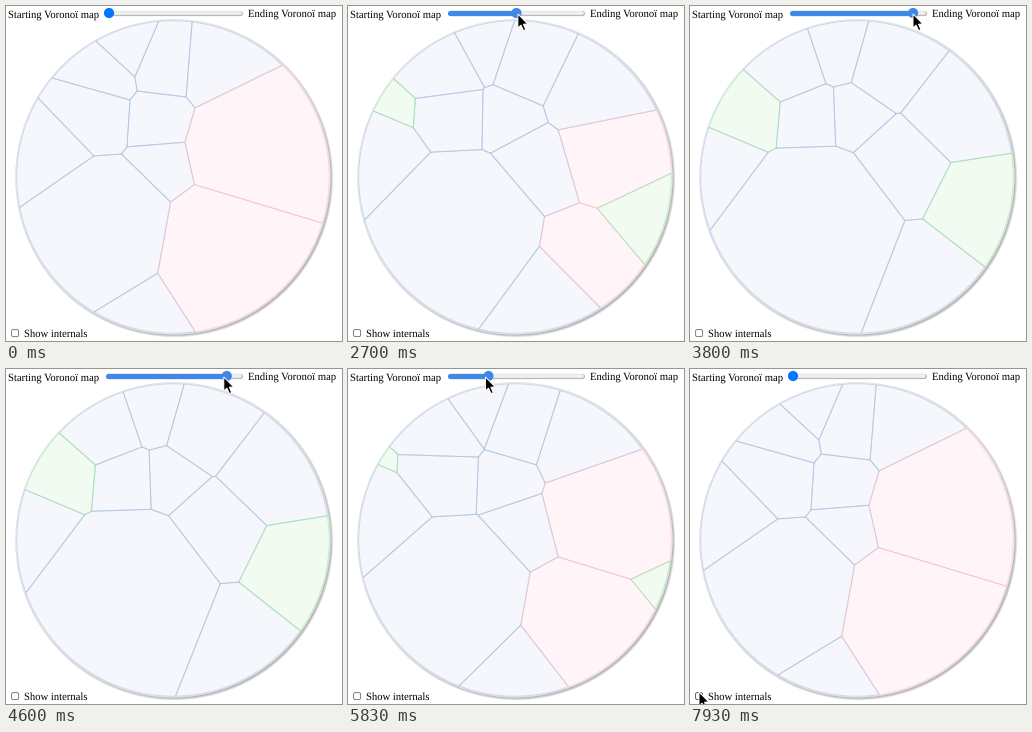
A matplotlib script that plays this animation: 336 px wide and 335 px high, repeating every 8000 ms.

```python
import numpy as np
import matplotlib.pyplot as plt
from matplotlib.animation import FuncAnimation
from matplotlib.patches import Circle, FancyBboxPatch, Polygon

W, H, DPI = 336, 335, 100
PX = 72 / DPI
LOOP, STEP = 8000, 32
CX, CY, R = 167, 171, 156.3

plt.rcParams["text.hinting"] = "none"

# Weighted sites: kind, (x, y, weight) at slider start, same at slider end
SITES = [
    ("stay", (153, 113, 0), (164, 109.7, 0)),
    ("stay", (157, 163, -14), (212.7, 159.7, 957)),
    ("stay", (88, 108.8, 316), (118.9, 111.9, 433)),
    ("stay", (44.7, 150.6, 488), (32.1, 162.7, 975)),
    ("stay", (99.1, 69.4, 22), (96.3, 60.2, 804)),
    ("stay", (122.8, 43.7, -86), (148.4, 44, 174)),
    ("stay", (159.5, 59.4, 204), (201.4, 58.7, 613)),
    ("stay", (213, 63.7, 610), (264.2, 110.3, 599)),
    ("stay", (140.8, 298, 550), (223.7, 262.4, 423)),
    ("stay", (96.3, 225, 4330), (122.2, 227.2, 7152)),
    ("leave", (251.2, 141.9, 4040), (249, 143, -3175)),
    ("leave", (219.4, 247.4, 4460), (217, 242.5, -5170)),
    ("enter", (62, 108.5, -3002), (56, 106.2, 1001)),
    ("enter", (278, 201, -4973), (273.4, 192, -36)),
]
KINDS = [kind for kind, _, _ in SITES]
START = np.array([a for _, a, _ in SITES], float)
END = np.array([b for _, _, b in SITES], float)

# Fill, outline, drawing order
STYLE = {"stay": ("#f5f7fc", "#a9bfdc", 3),
         "leave": ("#fff5f8", "#f7b9c4", 4),
         "enter": ("#f1fbf2", "#96e69a", 5)}

ANGLES = np.linspace(0, 2 * np.pi, 300, endpoint=False)
DISC = np.stack([CX + R * np.cos(ANGLES), CY + R * np.sin(ANGLES)], 1)
NOTHING = np.full((3, 2), -50.0)


def clip(poly, normal, offset):
    """Keep the part of a convex polygon where normal . p <= offset."""
    d = poly @ normal - offset
    inside = d <= 0
    if inside.all():
        return poly
    nxt, d_nxt = np.roll(poly, -1, 0), np.roll(d, -1)
    cross = inside != (d_nxt <= 0)
    u = np.where(cross, d / np.where(cross, d - d_nxt, 1), 0)[:, None]
    both = np.stack([poly, poly + u * (nxt - poly)], 1)
    return both[np.stack([inside, cross], 1)]


def cells(s):
    """Power diagram of the blended sites inside the disc."""
    site = START + s * (END - START)
    pos, lift = site[:, :2], (site[:, :2] ** 2).sum(1) - site[:, 2]
    out = []
    for i in range(len(site)):
        poly = DISC
        for j in range(len(site)):
            if j != i and len(poly):
                poly = clip(poly, 2 * (pos[j] - pos[i]), lift[j] - lift[i])
        out.append(poly if len(poly) > 2 else NOTHING)
    return out


# Slider drag: time and value
DRAG = ([1400, 1730, 2700, 3230, 3970, 4230, 4600, 5830, 6200, 6700, 7050],
        [0, .108, .512, .736, 1, 1, .907, .287, .18, .16, 0])
X0, X1, TRACK_Y = 103, 232, 7


def ease(a, b, t):
    u = np.clip((t - a) / (b - a), 0, 1)
    return u * u * (3 - 2 * u)


def pointer(t, thumb_x):
    grab = np.array([thumb_x + 1.5 - 4.5 * ease(3230, 4600, t), 8])
    if t < 500:
        return np.array([130, -40])
    if t < 1050:
        enter = np.array([130, -17])
        return enter + ease(440, 1050, t) * (grab - enter)
    return grab + ease(7080, 7700, t) * (np.array([9, 323]) - grab)


fig = plt.figure(figsize=(W / DPI, H / DPI), dpi=DPI, facecolor="white")
ax = fig.add_axes([0, 0, 1, 1])
ax.set(xlim=(0, W), ylim=(H, 0))
ax.axis("off")

# Soft shadow and rim
for rad in np.arange(155.4, 159.6, .6):
    ax.add_patch(Circle((168.2, 172.2), rad, fc="black", alpha=.075, lw=0,
                        zorder=1))
ax.add_patch(Circle((CX, CY), 157.3, fc="white", ec="#dce1e8", lw=.6 * PX,
                    zorder=1.1))

fills, lines = [], []
for kind in KINDS:
    face, line, z = STYLE[kind]
    fills.append(ax.add_patch(Polygon(NOTHING, fc=face, lw=0, zorder=2)))
    lines.append(ax.add_patch(Polygon(NOTHING, fill=False, ec=line, lw=PX,
                                      alpha=.6, joinstyle="round", zorder=z)))

for x, y, label in [(2, 12, "Starting Voronoï map"),
                    (241.5, 12, "Ending Voronoï map"),
                    (18, 331, "Show internals")]:
    ax.text(x, y, label, family="Liberation Serif", size=10.67 * PX,
            va="baseline", color="black", zorder=6)


def bar(x, width, color, z):
    return ax.plot([101.6, x], [TRACK_Y] * 2, color=color, lw=width * PX,
                   solid_capstyle="round", zorder=z)[0]


bar(234.4, 5.2, "#b8b8b8", 6)
bar(234.4, 3.8, "#efefef", 6.1)
done = bar(X0, 5.2, "#0075ff", 6.2)
thumb = ax.add_patch(Circle((X0, TRACK_Y), 5.1, lw=0, zorder=6.3))
box = ax.add_patch(FancyBboxPatch((5.6, 323.6), 7, 7,
                                  boxstyle="round,pad=0,rounding_size=1.6",
                                  fc="white", lw=.9 * PX, zorder=6))

ARROW = np.array([(0, 0), (0, 14), (3.1, 11.1), (5.6, 16.6), (7.9, 15.6),
                  (5.5, 10.2), (9.9, 10)])
cursor = ax.add_patch(Polygon(ARROW, fc="black", ec="white", lw=PX, zorder=9))


def draw(i):
    t = i * STEP
    s = np.interp(t, *DRAG)
    x = X0 + s * (X1 - X0)

    for poly, fill, line in zip(cells(s), fills, lines):
        fill.set_xy(poly)
        line.set_xy(poly)

    pressed, hover = 1170 <= t < 7080, 900 <= t < 1170
    accent = "#4088e8" if pressed else "#005cc8" if hover else "#0075ff"
    done.set_data([101.6, x], [TRACK_Y] * 2)
    done.set_color(accent)
    thumb.set_center((x, TRACK_Y))
    thumb.set_facecolor(accent)
    box.set_edgecolor("#8d8d8d" if t >= 7920 else
                      "#4f4f4f" if t >= 7600 else "#767676")
    cursor.set_xy(ARROW + pointer(t, x))
    return []


anim = FuncAnimation(fig, draw, frames=LOOP // STEP, interval=STEP,
                     repeat=True, repeat_delay=0)
plt.show()
```
